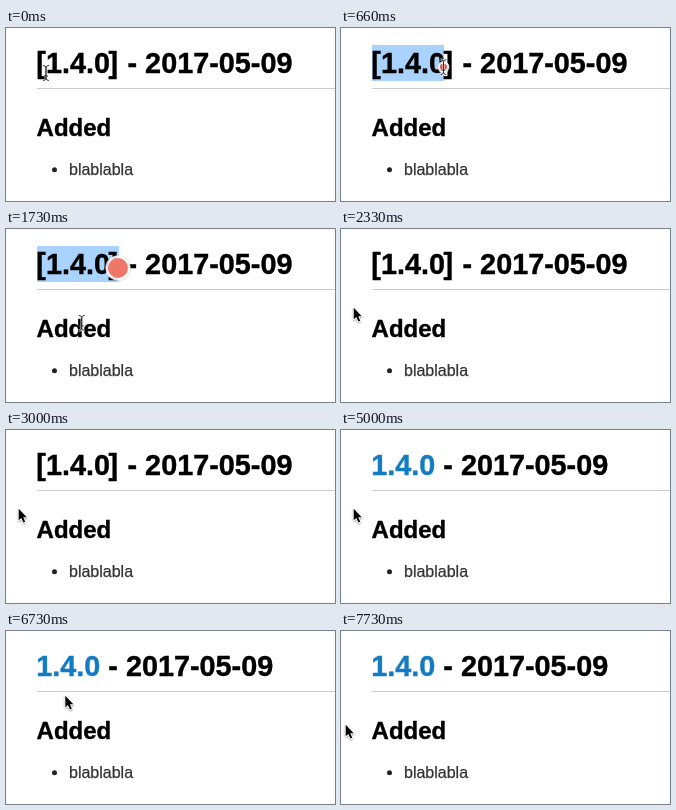
Animation of 329x173 px, one loop 7830 ms. Source, as an HTML page with a canvas:

```html
<!DOCTYPE html>
<html lang="en">
<head>
<meta charset="utf-8">
<title>Changelog link</title>
<style>
  html, body { margin: 0; width: 100%; height: 100%; overflow: hidden; background: #fff; }
  canvas { display: block; width: 329px; height: 173px; }
</style>
</head>
<body>
<canvas id="stage"></canvas>
<script>
const W = 329, H = 173, LOOP = 7830, TICK = 1000 / 15;
const FONT = '"Liberation Sans", Arial, sans-serif';
const HEAD = 'bold 28.8px ' + FONT;
const LEFT = 31, HEAD_X = 30.3, BASE = 45;
const VERSION = '[1.4.0]';
const canvas = document.getElementById('stage');
const ctx = canvas.getContext('2d');
const dpr = window.devicePixelRatio || 1;
canvas.width = W * dpr;
canvas.height = H * dpr;
ctx.scale(dpr, dpr);

const REST = [40, 45];
// Pointer strokes; "via" bends the way
const moves = [
  { from: 0, to: 260, end: [29, 40] },
  { from: 400, to: 860, end: [112, 39] },
  { from: 1130, to: 1730, end: [80, 95], via: [85, 175] },
  { from: 1730, to: 1860, end: [12, 78] },
  { from: 5670, to: 5990, end: [31, 41], via: [-10, 70] },
  { from: 6000, to: 6190, end: [45, 42] },
  { from: 6330, to: 6590, end: [58, 59] },
  { from: 6670, to: 7130, end: [60, 75] },
  { from: 7390, to: 7400, end: [4, 93] }
];

const ramp = (t, a, b) => Math.max(0, Math.min(1, (t - a) / (b - a)));
const easeOut = k => 1 - (1 - k) ** 2.5;
const mix = (a, b, k) => a + (b - a) * k;

function pointer(t) {
  let pos = REST;
  for (const { from, to, end, via } of moves) {
    if (t < from) break;
    const k = easeOut(ramp(t, from, to));
    pos = pos.map((p, i) => via
      ? mix(mix(p, via[i], k), mix(via[i], end[i], k), k)
      : mix(p, end[i], k));
  }
  return pos;
}

// A hairline stroke gives the heavier smoothing of the page
function text(str, x, y, font, color, weight = 0.4) {
  ctx.font = font;
  ctx.fillStyle = ctx.strokeStyle = color;
  ctx.lineWidth = weight;
  ctx.lineJoin = 'round';
  ctx.fillText(str, x, y);
  ctx.strokeText(str, x, y);
  return x + ctx.measureText(str).width;
}

function disc(x, y, r, color) {
  ctx.fillStyle = color;
  ctx.beginPath();
  ctx.arc(x, y, r, 0, Math.PI * 2);
  ctx.fill();
}

// The selection ends on the character edge nearest to the pointer
function selection(x) {
  ctx.font = HEAD;
  let end = LEFT;
  for (let n = 1; n <= VERSION.length; n++) {
    const edge = Math.floor(HEAD_X + ctx.measureText(VERSION.slice(0, n)).width);
    if (Math.abs(x - edge) < Math.abs(x - end)) end = edge;
  }
  ctx.fillStyle = '#a9d2fc';
  ctx.fillRect(LEFT, 17, end - LEFT, 36);
}

function page(linked) {
  let x;
  if (linked) {
    x = text('1.4.0', HEAD_X, BASE, HEAD, '#127bc4');
  } else {
    x = text('[1.4.0', HEAD_X, BASE, HEAD, '#000');
    x = text(']', x - 1.5, BASE, HEAD, '#000') + 1.5;
  }
  text(' - 2017-05-09', x, BASE, HEAD, '#000');
  ctx.fillStyle = '#ccc';
  ctx.fillRect(LEFT, 60, W - LEFT, 1);
  text('Added', 30.6, 108, 'bold 24px ' + FONT, '#000');
  disc(48.5, 141.7, 2.5, '#222');
  text('blablabla', 63, 147, '16px ' + FONT, '#333', 0.25);
}

function click(t, x, y) {
  const k = ramp(t, 600, 860);
  ctx.globalAlpha = 1 - ramp(t, 1860, 2330);
  disc(x, y, mix(4, 13, k), 'rgba(150,150,150,.35)');
  disc(x, y, mix(3.5, 12.4, k), 'rgba(255,255,255,.85)');
  disc(x, y, mix(1, 10, k), k < 1 ? '#d2453a' : '#f0766a');
  ctx.globalAlpha = 1;
}

function beam(x, y) {
  ctx.beginPath();
  for (const side of [-1, 1]) {
    ctx.moveTo(x + 3 * side, y - 7.5);
    ctx.quadraticCurveTo(x, y - 7.5, x, y - 5);
    ctx.lineTo(x, y + 5);
    ctx.quadraticCurveTo(x, y + 7.5, x + 3 * side, y + 7.5);
  }
  ctx.moveTo(x - 2, y + 3);
  ctx.lineTo(x + 2, y + 3);
  for (const [color, width] of [['rgba(255,255,255,.7)', 2.6], ['#333', 1]]) {
    ctx.strokeStyle = color;
    ctx.lineWidth = width;
    ctx.stroke();
  }
}

function arrow(x, y) {
  const shape = [[0, 0], [0, 11.5], [2.6, 9.2], [4.7, 13.8], [6.5, 13], [4.6, 8.5], [8, 8.5]];
  ctx.beginPath();
  shape.forEach(([dx, dy]) => ctx.lineTo(x + dx + 0.7, y + dy + 0.8));
  ctx.closePath();
  ctx.lineJoin = 'round';
  ctx.strokeStyle = '#fff';
  ctx.lineWidth = 1.6;
  ctx.shadowColor = 'rgba(0,0,0,.35)';
  ctx.shadowBlur = 2 * dpr;
  ctx.shadowOffsetY = dpr;
  ctx.stroke();
  ctx.shadowColor = 'transparent';
  ctx.fillStyle = '#000';
  ctx.fill();
}

function draw(ms) {
  const t = Math.floor((ms % LOOP + 12) / TICK) * TICK + 0.01;
  const [x, y] = pointer(t);
  const [mx, my] = pointer(Math.min(t, 1000));
  ctx.fillStyle = '#fff';
  ctx.fillRect(0, 0, W, H);
  if (t > 390 && t < 2330) selection(mx);
  page(t >= 5000);
  if (t > 600 && t < 2330) click(t, mx, my);
  if (t < 1790) beam(x, y);
  else if (t < 7390 || t > 7660) arrow(x, y);
}

const start = performance.now();
function loop() {
  draw(performance.now() - start);
  requestAnimationFrame(loop);
}
loop();
</script>
</body>
</html>
```
